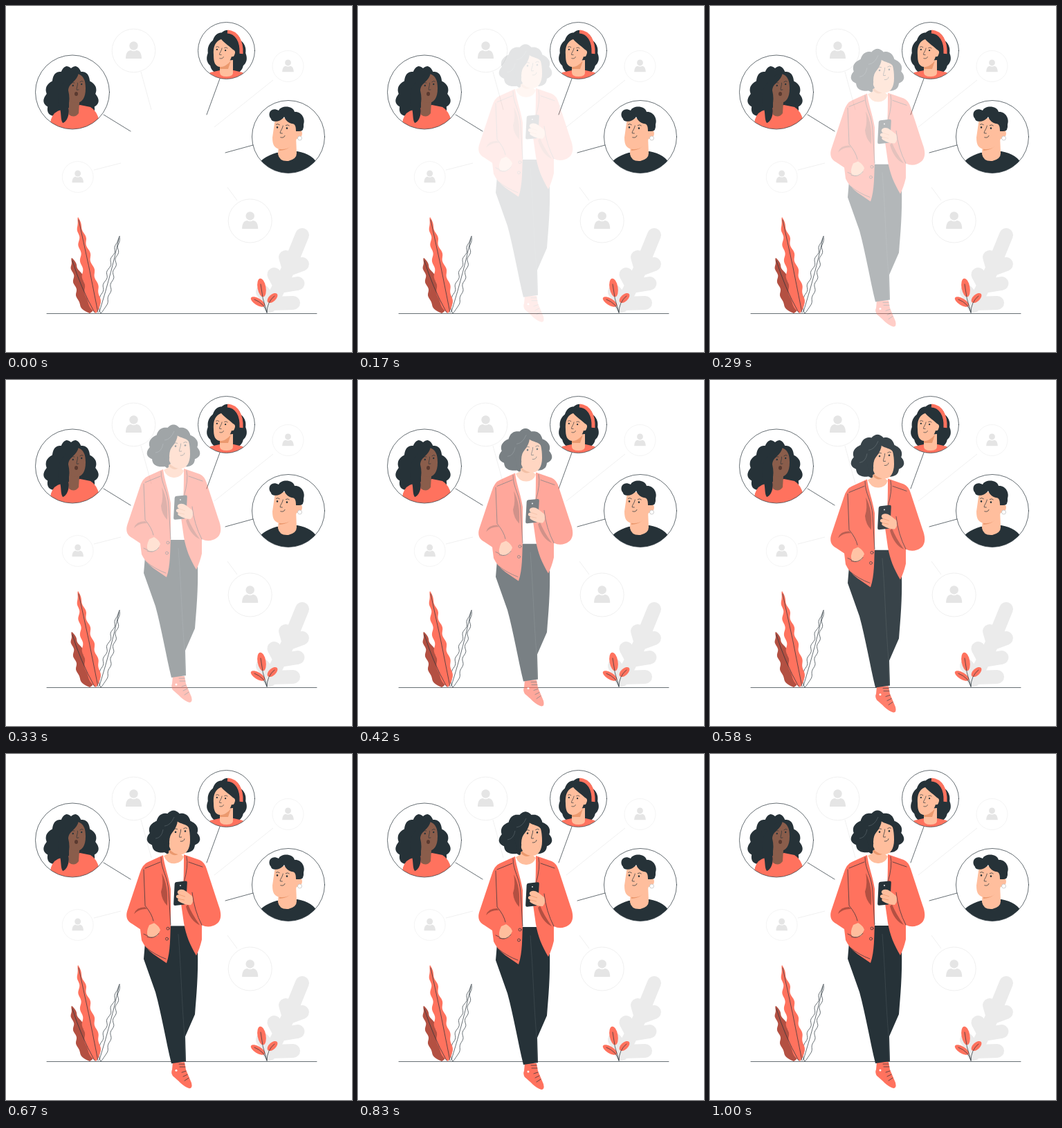
An HTML page for the animation above (1040 ms loop, 500 by 500 pixels).

```html
<!DOCTYPE html>
<html lang="en">
<head>
<meta charset="utf-8">
<title>Online friends</title>
<style>
  html, body { margin: 0; width: 100%; height: 100%; overflow: hidden; background: #fff; }
  svg { display: block; width: 100vw; height: 100vh; }
  .coral { fill: #ff725e; }
  .deep { fill: #b35042; }
  .dark { fill: #263238; }
  .skin { fill: #ffbe9d; }
  .shade { fill: #eb996e; }
  .brown { fill: #8a5d4b; }
  .white { fill: #fff; }
  .icon { fill: #e5e5e5; }
  .lobes { fill: none; stroke: #ebebeb; stroke-width: 20; stroke-linecap: round; }
  .line { fill: none; stroke: #263238; stroke-width: .7; stroke-linecap: round; stroke-linejoin: round; }
  .faint { fill: none; stroke: #ececec; stroke-width: .8; }
  #woman { opacity: 0; }
</style>
</head>
<body>
<svg viewBox="0 0 500 500">
  <defs>
    <clipPath id="c1"><circle cx="96" cy="124.5" r="53.3"/></clipPath>
    <clipPath id="c2"><circle cx="318.5" cy="64.5" r="40.8"/></clipPath>
    <clipPath id="c3"><circle cx="408" cy="189" r="52.2"/></clipPath>
    <g id="look">
      <circle class="dark" cx="-7" r="1.3"/><circle class="dark" cx="7" r="1.3"/>
      <path class="line" d="M1-3C1 1-3 6-2 8H1M-9-4Q-7-6-4-4M5-4Q8-6 10-4"/>
    </g>
    <g id="face">
      <use href="#look"/>
      <path class="line" d="M-1 14Q4 15 5 11"/>
    </g>
  </defs>

  <path class="faint" d="M195 95 210 150M386 107 301 175M127 237 166 227M334 281 320 262"/>
  <path class="line" d="M141 157 180 181M309 105 290 157M357 201 317 212"/>
  <g id="users"></g>

  <!-- curly hair friend -->
  <g clip-path="url(#c1)">
    <path class="dark" id="curls"/>
    <path class="coral" d="M62 180 65 164Q69 152 80 150L107 143 122 146Q131 151 135 166V180Z"/>
    <path class="brown" d="M91 134V157Q99 163 105 155L106 139Z"/>
    <path class="brown" d="M104 98C112 101 115 107 115 119C115 133 110 140 101 140C92 140 87 133 87 121C87 111 98 109 104 98Z"/>
    <path class="dark" d="M105 96C103 110 91 110 90 122Q93 134 90 145C93 158 87 168 82 169C78 164 81 152 76 144C72 120 84 102 105 96Z"/>
    <use href="#look" transform="translate(103 114) rotate(-9) scale(.9)"/>
    <ellipse cx="101.5" cy="127" rx="2.5" ry="3" fill="#5a3a30"/>
  </g>

  <!-- hairband friend -->
  <g clip-path="url(#c2)">
    <path class="dark" id="long"/>
    <path class="coral" d="M288 108 295 96 309 93H329L342 96 350 108Z"/>
    <path class="skin" d="M309 80V96Q309 102 319 102Q329 102 328 95V78Z"/>
    <path class="shade" d="M309 87Q319 87 325 79L321 91H309Z"/>
    <path class="skin" d="M311 48C316 54 324 59 328 63Q333 65 330 71Q329 74 326 73C323 83 316 89 309 88C302 87 300 81 300 71C299 58 303 51 311 48Z"/>
    <path d="M320 37C333 38 341 50 340 69" fill="none" stroke="#ff725e" stroke-width="5"/>
    <use href="#face" transform="translate(311 63.5) rotate(6) scale(.88)"/>
  </g>

  <!-- short hair friend -->
  <g clip-path="url(#c3)">
    <path class="dark" d="M364 230Q369 219 391 212L421 210Q444 214 451 230L446 246H368Z"/>
    <path class="skin" d="M394 196 393 214Q395 225 408 224Q420 221 420 213L419 188Z"/>
    <path class="shade" d="M395 206Q407 206 416 194 412 208 395 209Z"/>
    <path class="skin" d="M389 162H418L421 181Q427 177 428 184Q428 191 420 192C416 202 407 208 397 207C388 206 385 201 385 190Z"/>
    <path class="dark" d="M394 151C397 144 414 143 417 153C427 152 433 163 430 171Q431 181 424 181H419C419 174 418 170 413 170Q405 168 402 160C396 169 383 168 383 163C377 157 382 145 394 151Z"/>
    <use href="#face" transform="translate(399 176) rotate(5)"/>
    <circle cx="424.5" cy="191" r="3" fill="#fff" stroke="#bbb" stroke-width=".7"/>
  </g>
  <g class="line">
    <circle cx="96" cy="124.5" r="53.5"/>
    <circle cx="318.5" cy="64.5" r="41"/>
    <circle cx="408" cy="189" r="52.5"/>
  </g>

  <!-- plants -->
  <path class="line" id="paleLeaf"/>
  <path class="deep" id="deepLeaf"/>
  <path class="coral" id="coralLeaf"/>
  <path class="line" d="M96 368Q107 405 128 443M105 309Q120 375 133 443M163 336Q154 380 135 442"/>
  <path class="lobes" id="lobes"/>
  <g class="coral">
    <ellipse cx="369.500" cy="407" rx="6" ry="13.500" transform="rotate(-10 369.500 407)"/>
    <ellipse cx="385" cy="422" rx="9" ry="5" transform="rotate(-42 385 422)"/>
    <ellipse cx="364" cy="427.500" rx="11.500" ry="5" transform="rotate(31 364 427.500)"/>
  </g>
  <path class="line" d="M368 402Q370 423 377 443M388 419Q377 428 377 443M359 424Q374 430 377 443M59 444.500H449"/>

  <g id="woman">
    <!-- shoe and trousers -->
    <path class="coral" d="M241 445H258L260 456 268 475Q270 483 265 483C256 481 248 470 241 465Q238 460 240 456Z"/>
    <path class="line" d="M250 448H258M251 452H259M254 460 260 458M256 466 262 463M258 472 264 468"/>
    <circle class="white" cx="246" cy="457" r="1.5"/>
    <path class="dark" d="M235 248H259L277 284C278 320 275 350 273 376L259 408 260 444 239 447C231 414 225 377 216 344L199 296 201 272Z"/>
    <path d="M249 260C253 310 254 360 258 407L259 443" fill="none" stroke="#465157" stroke-width=".6"/>

    <!-- head and shirt -->
    <path class="white" d="M228 149H257L261 200 259 248H236L231 190Z"/>
    <path class="dark" id="bob"/>
    <path class="skin" d="M236 130 235 143 228 147Q233 159 244 158Q254 157 257 148L251 143 252 132Z"/>
    <path class="shade" d="M236 137Q241 144 250 144Q243 149 236 142Z"/>
    <path class="skin" d="M247 97C253 101 261 101 264 106Q266 113 266 124C266 138 260 146 250 145C241 144 236 137 236 127C236 113 245 109 247 97Z"/>
    <path class="dark" d="M248 96C247 108 239 113 236 120Q233 130 238 138L231 142 226 120 236 98Z"/>
    <use href="#face" transform="translate(252 112) rotate(-5)"/>
    <path d="M229 104Q238 103 243 91M216 122Q225 121 227 109" fill="none" stroke="#69757b" stroke-width=".5"/>

    <!-- jacket -->
    <path class="coral" d="M227 146 205 156Q197 159 193 173L176 224C172 235 175 241 182 245L194 253 196 269Q201 280 213 289L232 302C238 285 237 263 238 245V195C235 176 229 162 227 146Z"/>
    <path class="coral" d="M257 145 280 153Q287 156 290 166L307 218C313 233 311 244 299 248Q291 251 283 247V268Q280 281 275 291C266 276 260 262 257 244L253 216C257 195 257 170 257 145Z"/>
    <path class="deep" d="M225 172Q235 190 233 219Q225 211 224 199Q228 187 225 172ZM263 217Q268 230 280 247Q266 241 260 220ZM185 231Q188 221 201 221L204 224Q193 223 185 231Z"/>
    <path class="line" d="M224 149C224 168 234 176 235 199L238 247M261 148Q264 162 257 185M199 167 201 219Q211 231 213 241M201 165 223 156M264 156 284 163M269 200Q272 226 283 247M199 260Q207 264 211 265M203 280Q215 290 231 296"/>
    <g class="line"><circle cx="234" cy="252" r="2"/><circle cx="232.500" cy="267" r="2"/></g>

    <!-- hands and phone -->
    <path class="skin" d="M207 247 214 244Q221 248 223 254L219 262Q212 267 205 263Q202 257 207 247Z"/>
    <path class="line" d="M204 264Q214 268 221 259"/>
    <rect class="dark" x="243" y="184" width="18" height="34" rx="2.500" transform="rotate(3 252 201) skewY(-9) translate(0 40)"/>
    <circle class="white" cx="252" cy="190" r=".9"/>
    <path class="skin" d="M249 197Q254 194 260 198L269 205Q272 213 267 218Q258 218 250 213Q247 211 249 209L246 207Q245 203 250 203Q246 200 249 197Z"/>
    <path d="M250 203 259 206M249 209 258 211" fill="none" stroke="#eb996e" stroke-width=".8"/>
  </g>
</svg>
<script>
  const byId = id => document.getElementById(id);
  const shape = (id, d) => byId(id).setAttribute('d', d);
  const outline = pts => 'M' + pts.map(p => p.map(v => v.toFixed(1))).join('L') + 'Z';
  const range = (n, f) => Array.from({ length: n + 1 }, (_, i) => f(i / n));

  // Curly outline: an ellipse with soft bumps, wider towards the bottom.
  const curly = (cx, cy, rx, ry, bumps, depth, flare) => outline(range(180, t => {
    const a = t * 2 * Math.PI;
    const r = 1 - depth + 2 * depth * Math.abs(Math.sin(a * bumps / 2));
    return [cx + rx * r * Math.cos(a) * (1 + flare * Math.sin(a)), cy + ry * r * Math.sin(a)];
  }));

  // Wavy leaf from tip to base: both edges sway together.
  function leaf(tipX, tipY, baseX, baseY, width, waves) {
    const edge = side => t => {
      const half = width * t ** .6 * (1 - t ** 14);
      const sway = 1.5 * Math.sin(t * waves * 2 * Math.PI) * Math.min(1, t * 6) * (1 - t ** 6);
      return [tipX + (baseX - tipX) * t + side * half + sway, tipY + (baseY - tipY) * t];
    };
    return outline([...range(80, edge(1)), ...range(80, edge(-1)).reverse()]);
  }

  // Broad leaf: pairs of rounded lobes along a slanted stem.
  function lobes() {
    let d = 'M381 433 408 380 428 331';
    for (let i = 0; i < 3; i++) {
      const x = 384 + 12.5 * i, y = 430 - 25 * i;
      d += `M${x} ${y}l${4 * i - 13}-17M${x} ${y}l${31 - 6 * i}${-1 - 3 * i}`;
    }
    return d;
  }

  const user = (x, y, r) => `<g transform="translate(${x} ${y}) scale(${r / 31.3})">
    <circle class="faint" r="31.3"/><circle class="icon" cy="-7" r="6.2"/>
    <path class="icon" d="M-11.5 11.5C-11.5 3-8-.5-4-.5Q0 2 4-.5C8-.5 11.5 3 11.5 11.5Z"/></g>`;

  byId('users').innerHTML =
    user(184.5, 64.5, 31.3) + user(407.5, 87, 22.5) + user(103.7, 247, 22.4) + user(352.7, 310.5, 31.5);
  shape('curls', curly(94, 127, 37, 39, 12, .05, .22));
  shape('long', curly(319, 68, 28, 32, 10, .03, .14));
  shape('bob', curly(242, 114, 36, 31, 10, .05, .2));
  shape('paleLeaf', leaf(164, 333, 137, 444, 7, 6));
  shape('deepLeaf', leaf(95, 364, 121, 444, 13, 4));
  shape('coralLeaf', leaf(104, 305, 130, 444, 12, 6));
  shape('lobes', lobes());

  const LOOP = 1040, FRAMES = 24, FIRST = 3, LEAD = .02, DROP = 30;
  const bez = (a, b, t) => 3 * (1 - t) * (1 - t) * t * a + 3 * (1 - t) * t * t * b + t * t * t;

  // cubic-bezier(.36, -.01, .5, 1.38), overshooting near the end
  function ease(x) {
    if (x >= 1) return 1;
    let lo = 0, hi = 1;
    for (let i = 0; i < 24; i++) {
      const mid = (lo + hi) / 2;
      if (bez(.36, .5, mid) < x) lo = mid; else hi = mid;
    }
    return bez(-.01, 1.38, lo);
  }

  const woman = byId('woman');
  const start = performance.now();

  function draw() {
    const ms = Math.max(0, performance.now() - start) % LOOP;
    const step = Math.min(FRAMES, Math.floor((ms + 5) * FRAMES / 1000));
    const y = ease(step / FRAMES + LEAD);
    woman.style.opacity = step < FIRST ? 0 : Math.min(1, y);
    woman.setAttribute('transform', `translate(0 ${(DROP * (y - 1)).toFixed(2)})`);
    requestAnimationFrame(draw);
  }
  draw();
</script>
</body>
</html>
```
